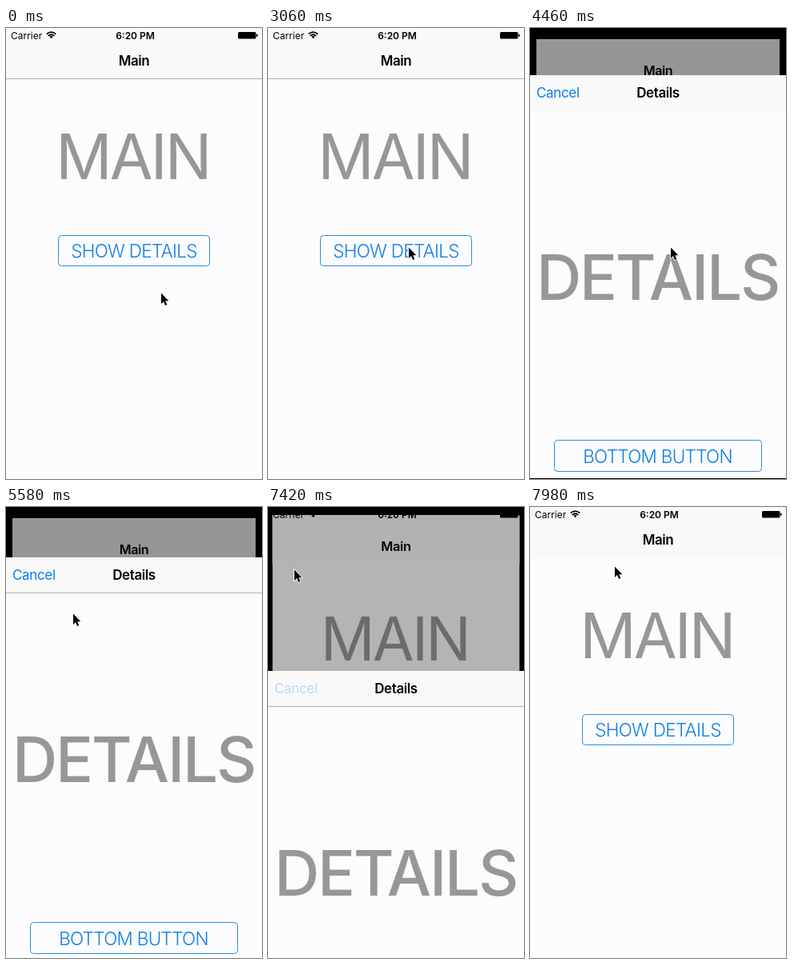
An HTML page for the animation above (8 s loop, 320 by 564 pixels).

```html
<!DOCTYPE html>
<html lang="en">
<head>
<meta charset="utf-8">
<title>Modal sheet</title>
<style>
  html, body { margin: 0; width: 100%; height: 100%; overflow: hidden; background: #000; }
  svg { display: block; width: 320px; height: 564px; font-family: Inter, Roboto, sans-serif; }
  .mid { text-anchor: middle; }
  .title { font-size: 17px; font-weight: 600; letter-spacing: -.4px; }
  .huge { font-size: 78px; fill: #979797; }
  .button rect { fill: none; stroke: #2a8ce0; rx: 4px; }
  .button text { font-size: 22.5px; font-weight: 300; letter-spacing: -.7px; fill: #0f7fe6; }
  .page { fill: #fcfcfe; }
  .bar { fill: #f9f9f9; }
  .line { fill: #b0b0b4; }
  .status { font-size: 12px; }
</style>
</head>
<body>
<svg viewBox="0 0 320 564">
  <rect width="320" height="564"/>

  <g id="main">
    <rect class="page" width="320" height="564"/>
    <rect class="bar" width="320" height="63"/>
    <rect id="mainLine" class="line" y="63" width="320" height="1"/>
    <text class="title mid" x="160" y="47">Main</text>
    <text class="huge mid" x="158.4" y="189" letter-spacing="-2.9">MAIN</text>
    <g class="button">
      <rect x="65.5" y="259.5" width="189" height="38"/>
      <text id="showLabel" class="mid" x="160" y="287">SHOW DETAILS</text>
    </g>
    <rect id="dim" width="320" height="564"/>
  </g>

  <g class="status">
    <text x="6" y="13.5">Carrier</text>
    <g fill="none" stroke="#000" stroke-width="1.7">
      <path d="M50.6 7.6Q56.5 2.7 62.4 7.6M52.7 9.8Q56.5 6.7 60.3 9.8"/>
      <path d="M54.3 10.8Q56.5 9.4 58.7 10.8L56.5 13.2Z" fill="#000" stroke="none"/>
    </g>
    <text class="mid" x="161.5" y="13.5" font-weight="600">6:20 PM</text>
    <rect x="290" y="5" width="22.5" height="8.5" rx="1.5"/>
    <rect x="313" y="7.5" width="1.5" height="3.5" rx=".7"/>
  </g>

  <g id="sheet">
    <rect class="page" width="320" height="504"/>
    <rect class="bar" width="320" height="44"/>
    <rect id="sheetLine" class="line" y="44" width="320" height="1"/>
    <text id="cancel" x="8" y="28" font-size="17" letter-spacing="-.35" fill="#0a7cee">Cancel</text>
    <text class="title mid" x="160" y="28">Details</text>
    <text class="huge mid" x="159.5" y="280.5" font-weight="500" letter-spacing="-2.2">DETAILS</text>
    <g class="button">
      <rect x="30.5" y="456.5" width="259" height="39"/>
      <text class="mid" x="159.5" y="484.5">BOTTOM BUTTON</text>
    </g>
  </g>

  <path id="cursor" d="M1 1.5V15L4 12.100L6.200 17L8.300 16.100L6.200 11.300H10.300Z"
        stroke="#fff" stroke-width="1.6" paint-order="stroke"/>
</svg>

<script>
const $ = id => document.getElementById(id);
const LOOP = 8000, STEP = 20, CYCLE = 840, PHASE = 820, ACTIVE = 740, RECORDED = 780;
const PRESS = 3720, RELEASE = 3920, OPEN = 3955.8, CANCEL = 7180, CLOSE = 7342.6;

// time, x, y of the pointer tip
const pointer = [
  [0, 193, 330], [850, 193, 330], [1250, 197, 336], [1700, 193, 331],
  [2420, 175, 273], [4800, 175, 273], [5580, 83, 132],
  [6400, 32, 77], [7450, 32, 77], [7980, 105, 73], [8000, 105, 73]
];

const clamp = (v, lo = 0, hi = 1) => Math.min(hi, Math.max(lo, v));
const mix = (a, b, k) => a + (b - a) * k;

// Each cycle ends with a short hold; "shown" is loop time, "recorded" skips the hold.
function clock(t) {
  const n = Math.floor((t - PHASE) / CYCLE);
  const u = Math.min(t - PHASE - n * CYCLE, ACTIVE);
  return { shown: Math.max(0, PHASE + n * CYCLE + u), recorded: n * RECORDED + u };
}

function spring(ms) {
  if (ms <= 0) return 0;
  const zeta = .84, w = .01287, wd = w * Math.sqrt(1 - zeta * zeta);
  return 1 - Math.exp(-zeta * w * ms) * (Math.cos(wd * ms) + zeta * w / wd * Math.sin(wd * ms));
}

function pointerAt(t) {
  const i = Math.max(1, pointer.findIndex(k => k[0] >= t));
  const [t0, x0, y0] = pointer[i - 1], [t1, x1, y1] = pointer[i];
  const k = clamp((t - t0) / (t1 - t0)), e = k * k * (3 - 2 * k);
  return [mix(x0, x1, e), mix(y0, y1, e)];
}

function render(time) {
  const { shown: t, recorded } = clock(time);
  const since = start => recorded - clock(start).recorded;
  const p = spring(since(OPEN)) - spring(since(CLOSE));
  const depth = clamp(p);

  const scale = 1 - .05 * depth;
  $("main").setAttribute("transform", `translate(160 282) scale(${scale}) translate(-160 -282)`);
  $("dim").setAttribute("opacity", .4 * depth);
  $("mainLine").setAttribute("opacity", t < OPEN ? 1 : 0);
  $("showLabel").setAttribute("opacity",
    t < PRESS ? 1 : t < RELEASE ? .2 : mix(.2, 1, clamp((t - RELEASE) / 450)));

  $("sheet").setAttribute("transform", `translate(0 ${Math.round(564 - 501 * p)})`);
  $("sheetLine").setAttribute("opacity", t > 4700 ? 1 : 0);
  $("cancel").setAttribute("opacity", t < CANCEL ? 1 : .25);

  $("cursor").setAttribute("transform", `translate(${pointerAt(t)})`);
}

function tick() {
  const now = performance.now() % LOOP;
  render(Math.floor(now / STEP) * STEP);
  requestAnimationFrame(tick);
}
tick();
</script>
</body>
</html>
```
